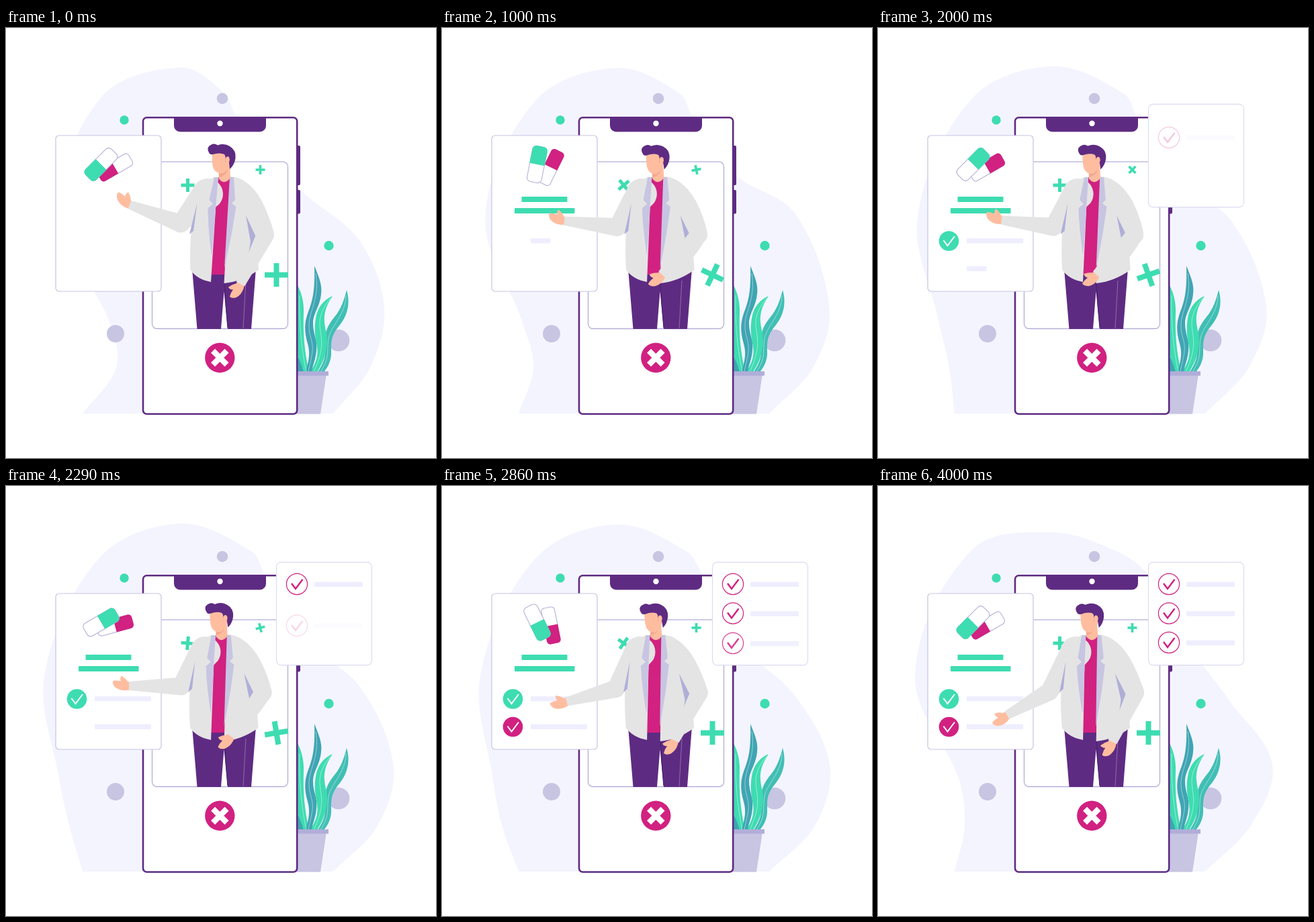
An HTML page with a canvas that plays this animation: 640x640 px, repeating every 4.07 s.

```html
<!DOCTYPE html>
<html lang="en">
<head>
<meta charset="utf-8">
<title>Online doctor</title>
<style>
html, body { margin: 0; width: 100%; height: 100%; overflow: hidden; background: #fff; }
canvas { display: block; }
</style>
</head>
<body>
<canvas id="stage" width="640" height="640"></canvas>
<script>
const ctx = document.getElementById('stage').getContext('2d');
const LOOP = 4070, STEPS = 57, RAD = Math.PI / 180;
const PURPLE = '#5e2b82', PINK = '#d12181', MINT = '#3edcb1', TEAL = '#3fa5b3',
  LILAC = '#c7c5e2', LINE = '#b3b0d8', SHADE = '#b0aed8', PALE = '#efeeff',
  COAT = '#e4e4e4', SKIN = '#ffbda0';

const KEYS = [0, 8, 20, 28, 36, 45, 56];
// lean, right wrist x y, left elbow x y, left wrist x y
const BODY = [
  [0, 349, 381, 260, 291, 184, 263],
  [-7, 338, 376, 261, 296, 181, 285],
  [-7.5, 317, 358, 261, 297, 183, 289],
  [-5.5, 325, 367, 261, 296, 184, 286],
  [-11, 344, 378, 260, 300, 182, 309],
  [-15.5, 349, 380, 257, 304, 190, 336],
  [-13, 349, 381, 255, 306, 192, 341]
];
// each value is the free coordinate of one outline point
const BLOB = [
  [164, 153, 80, 105, 59, 325, 343, 240, 315, 563, 542],
  [149, 133, 71, 110, 60, 340, 360, 225, 283, 571, 548],
  [123, 104, 58, 105, 59, 367, 385, 213, 268, 582, 557],
  [106, 90, 59, 105, 57, 365, 385, 222, 286, 578, 552],
  [82, 68, 56, 107, 55, 365, 385, 232, 307, 575, 555],
  [98, 85, 59, 107, 60, 362, 390, 226, 318, 580, 556],
  [129, 120, 55, 95, 69, 355, 402, 203, 322, 587, 555]
];

const clamp = v => Math.max(0, Math.min(1, v));
const part = (k, from, length) => clamp((k - from) / length);
const smooth = p => p * p * (3 - 2 * p);
const ease = (k, from, length) => smooth(part(k, from, length));

function pose(table, k) {
  let i = 0;
  while (i < KEYS.length - 2 && k >= KEYS[i + 1]) i++;
  const p = (k - KEYS[i]) / (KEYS[i + 1] - KEYS[i]);
  return table[i].map((v, j) => v + (table[i + 1][j] - v) * p);
}

function paint(fill, stroke, width) {
  if (fill) { ctx.fillStyle = fill; ctx.fill(); }
  if (stroke) { ctx.strokeStyle = stroke; ctx.lineWidth = width; ctx.stroke(); }
}
function box(x, y, w, h, r, fill, stroke, width) {
  ctx.beginPath();
  ctx.roundRect(x, y, w, h, r);
  paint(fill, stroke, width);
}
function disc(x, y, r, fill, stroke, width) {
  ctx.beginPath();
  ctx.arc(x, y, r, 0, 7);
  paint(fill, stroke, width);
}
function shape(d, fill) {
  ctx.fillStyle = fill;
  ctx.fill(new Path2D(d));
}
function line(d, color, width) {
  ctx.strokeStyle = color;
  ctx.lineWidth = width;
  ctx.stroke(new Path2D(d));
}
function at(x, y, angle, scale, draw) {
  ctx.save();
  ctx.translate(x, y);
  ctx.rotate(angle);
  ctx.scale(scale, scale);
  draw();
  ctx.restore();
}
function plus(x, y, size, thick, degrees, color = MINT) {
  at(x, y, degrees * RAD, 1, () => {
    ctx.fillStyle = color;
    ctx.fillRect(-size / 2, -thick / 2, size, thick);
    ctx.fillRect(-thick / 2, -size / 2, thick, size);
  });
}

function curve(pts) {
  const dir = (a, b) => {
    const l = Math.hypot(b[0] - a[0], b[1] - a[1]);
    return [(b[0] - a[0]) / l, (b[1] - a[1]) / l];
  };
  ctx.beginPath();
  ctx.moveTo(...pts[0]);
  for (let i = 0; i < pts.length - 1; i++) {
    const a = pts[i], b = pts[i + 1];
    const u = dir(pts[i - 1] || a, b), v = dir(a, pts[i + 2] || b);
    const l = Math.hypot(b[0] - a[0], b[1] - a[1]) / 3;
    ctx.bezierCurveTo(a[0] + u[0] * l, a[1] + u[1] * l, b[0] - v[0] * l, b[1] - v[1] * l, ...b);
  }
}

function backdrop(k) {
  const b = pose(BLOB, k);
  curve([[114, 574], [b[0], 505], [b[1], 435], [b[2], 280], [140, b[3]], [260, b[4]], [b[5], 97],
    [b[6], 132], [437, b[7]], [525, b[8]], [b[9], 415], [b[10], 505], [487, 574]]);
  paint('#f4f4ff');
  disc(322, 105, 8.3, LILAC);
  disc(163, 455, 13, LILAC);
  disc(495, 465, 16.3, LILAC);
  disc(176, 137, 6.7, MINT);
  disc(480.5, 324, 7.2, MINT);
}

function plant() {
  const vein = 'rgba(255,255,255,.45)';
  shape('M430 376Q444 398 443 424C442 455 444 480 451 512L442 512Q434 490 430 470Z', MINT);
  shape('M430 482Q438 494 443 512L430 512Z', TEAL);
  shape('M507 390C513 410 508 428 497 442C483 458 484 468 484 480C485 496 478 506 473 512L464 512C473 498 476 490 475 474C473 452 480 441 489 430C499 418 503 405 507 390Z', '#40bfb4');
  line('M506 398C506 424 486 442 481 458C476 478 484 488 468 512', vein, 1);
  shape('M486 399C476 414 473 425 474 438C475 450 480 460 477 476C475 492 468 504 463 512L453 512C461 498 465 490 463 474C459 455 459 444 461 432C464 414 474 404 486 399Z', MINT);
  line('M483 402C462 428 467 442 469 458C472 480 465 496 458 512', vein, 1);
  shape('M459 354C465 369 471 382 469 396C467 416 457 424 457 440C457 456 464 464 462 480C461 494 456 502 455 512L446 512C451 494 453 484 449 470C443 449 445 437 449 425C457 405 460 390 459 354Z', TEAL);
  line('M461 365C467 402 452 420 451 440C450 458 458 466 456 482C454 496 451 504 450 512', vein, 1);
  line('M437 398C436 440 440 480 447 512', vein, 1);
  shape('M430 515H477L468 574.5H430Z', LILAC);
  shape('M430 511H480V517.5H430Z', SHADE);
}

function phone() {
  box(430, 175, 8, 59, 2, PURPLE);
  box(430, 241, 8, 35.5, 2, PURPLE);
  box(204, 133.2, 229.2, 441.3, 5.5, '#fff', PURPLE, 2.6);
  box(250, 133, 137, 21.5, [0, 0, 9, 9], PURPLE);
  disc(318.5, 142, 4.2, '#fff');
  box(217.5, 199.2, 202, 248.3, 7, null, LINE, 1.3);
  disc(318.3, 490.7, 22.2, PINK);
  plus(318.3, 490.7, 29, 8.5, 45, '#fff');
}

function tick(color, width) {
  line('M-8 -1L-2 7L8.5 -7', color, width);
}

function pill(x, y, w, r, degrees, color) {
  at(x, y, degrees * RAD, 1, () => {
    box(-27, -w / 2, 54, w, r, '#fff', LINE, 1.1);
    box(0, -w / 2 - .4, 27.4, w + .8, [0, r, r, 0], color);
  });
}

function prescription(k) {
  box(74, 160, 157, 232, 5, '#fff', LILAC, 1.2);
  const turn = from => smooth(part(k, from, 21) ** .8) * 180;
  const angle = 135 + turn(0) + turn(29.6);
  pill(162, 207.5, 20, 5, angle + 15, PINK);
  pill(141.5, 203, 22, 6, angle, MINT);

  const bar = (x, y, w, h, grown, color) => grown > 0 && box(x, y, w * grown, h, 1, color);
  bar(118.5, 251, 68, 8, ease(k, 2, 5), MINT);
  bar(108, 268, 89.5, 8, ease(k, 6.4, 6), MINT);
  [[317, MINT, 12, 17.9], [358.5, PINK, 26, 31.7]].forEach(([y, color, barStart, tickStart]) => {
    bar(132, y - 4, 84, 7.5, ease(k, barStart, 5), PALE);
    const size = ease(k, tickStart, 6);
    if (size > 0) at(105.5, y, 0, size, () => {
      disc(0, 0, 14.8, color);
      tick('#fff', 2);
    });
  });
}

function checklist(k) {
  const alpha = part(k, 14, 7);
  if (!alpha) return;
  const y = 180 - 86 * ease(k, 13, 10) + 19.3 * ease(k, 23, 5);
  ctx.globalAlpha = alpha;
  box(402.5, y, 142, 153.3, 7, '#fff', '#dcdaf1', 1.2);
  for (let i = 0; i < 3; i++) {
    const p = part(k, 26.7 + i * 4.35, 5.3);
    if (!p) continue;
    const rowY = 146 + i * 43.5 + 20 * (1 - smooth(p));
    ctx.globalAlpha = p;
    box(459, rowY - 3.2, 72, 7.4, 1, PALE);
    at(433, rowY, 0, 1, () => {
      disc(0, 0, 15.6, null, PINK, 1.2);
      tick(PINK, 2.5);
    });
  }
  ctx.globalAlpha = 1;
}

// tapered limb with round ends
function limb(x1, y1, r1, x2, y2, r2) {
  const a = Math.atan2(y2 - y1, x2 - x1), n = a + Math.PI / 2;
  const c = Math.cos(n), s = Math.sin(n);
  ctx.beginPath();
  ctx.moveTo(x1 + c * r1, y1 + s * r1);
  ctx.arc(x1, y1, r1, n, n + Math.PI);
  ctx.lineTo(x2 - c * r2, y2 - s * r2);
  ctx.lineTo(x2 + c * r2, y2 + s * r2);
  ctx.closePath();
  paint(COAT);
  return a;
}
function hand(x, y, angle) {
  at(x, y, angle, 1, () =>
    shape('M-4 -5L3 -7.5Q12 -10 20 -6Q26 -1 24.5 3Q18 5 13 4.5Q16 8 14 12.5Q7 10 3 6L-4 5Z', SKIN));
}

function head(lean) {
  at(322 + lean * .3, 215 - lean * .13, lean * .005, 1, () => {
    ctx.translate(-322, -215);
    shape('M307 187Q306 206 310 211Q314 217 322 216Q329 212 333 200L331 182Z', SKIN);
    shape('M303 187Q297 178 305 174Q310 171 315 174.500Q325 171 333 176Q343 182 341.500 194Q340 204 333 210L332 200L326 199Q328 192 325 188Q318 185 308 188Q305 189 303 187Z', PURPLE);
    ctx.beginPath();
    ctx.ellipse(329.5, 196.500, 3.3, 5.3, .15, 0, 7);
    paint(SKIN);
  });
}

function doctor(k) {
  const [lean, rx, ry, ex, ey, lx, ly] = pose(BODY, k);
  const shear = lean / 300;
  const bend = (349 - rx) * .11;
  const shift = y => shear * (375 - y);
  const leaning = draw => {
    ctx.save();
    ctx.transform(1, 0, -shear, 1, shear * 375, 0);
    draw();
    ctx.restore();
  };

  shape('M277 358L284.500 448H320L324.500 392L330 448H365L372 358Z', PURPLE);
  line('M325 380Q327 412 330 446', '#4a2170', 1.2);
  line('M357 376Q355 412 353 447', 'rgba(255,255,255,.3)', 1);

  leaning(() => {
    shape('M314 222H335L326 367H305Z', PINK);
    shape('M311 222C294 227 284 240 283 262C276 285 273 320 274.500 360Q284 374 305 378L315 224Z', COAT);
    const right = 399 - bend;
    shape(`M334 221C356 222 372 241 381 258Q392 280 ${right} 305C${right - 2} 316 382 332 375 341L376 360Q352 377 324.500 380L327 340Z`, COAT);
    shape('M310 222L316 222L306 338Q301 300 300.500 268L308 262L302.500 256Z', LILAC);
    shape('M333 222L339 222L341 256L336 261L342.500 266L336 305L325 358Z', LILAC);
    shape('M357 279L373 313L359 347L364 318Z', SHADE);
    shape('M317 200L316.500 224Q325 235 334 223L333 196Z', SKIN);
    shape('M317 216Q324 218 330 210Q328 220 317 222Z', '#f3a78c');
  });
  head(lean);

  const elbowX = 386 + shift(308) - bend;
  const rightAngle = Math.atan2(ry - 308, rx - elbowX);
  hand(rx, ry, rightAngle + .12);
  limb(elbowX, 308, 13, rx, ry, 7);

  const leftAngle = (Math.atan2(ly - ey, lx - ex) + 2 * Math.PI) % (2 * Math.PI);
  hand(lx, ly, leftAngle + (leftAngle - 160 * RAD) * .55);
  limb(300 + shift(247), 247, 23, ex, ey, 13);
  limb(ex, ey, 13.5, lx, ly, 6.5);
  leaning(() => {
    shape('M284.500 261L273 307L279 302Z', SHADE);
    // lapel stays above the sleeve
    shape('M310 222L316 222L306 338Q301 300 300.500 268L308 262L302.500 256Z', LILAC);
  });
}

function render(k) {
  ctx.fillStyle = '#fff';
  ctx.fillRect(0, 0, 640, 640);
  backdrop(k);
  plant();
  phone();
  prescription(k);
  checklist(k);
  plus(270.5, 234, 20, 5, 90 * (ease(k, 0, 26) + ease(k, 28, 28)));
  plus(378.5, 211, 14, 3.6, 90 * (ease(k, 0, 18) + ease(k, 20, 16) + ease(k, 41, 15)));
  plus(402.5, 367.5, 35, 8, 90 * ease(k, 0, 40));
  doctor(k);
}

const start = performance.now();
function frame() {
  const t = (performance.now() - start) % LOOP;
  render(Math.min(STEPS - 1, Math.floor((t + 5) / LOOP * STEPS)));
  requestAnimationFrame(frame);
}
frame();
</script>
</body>
</html>
```
